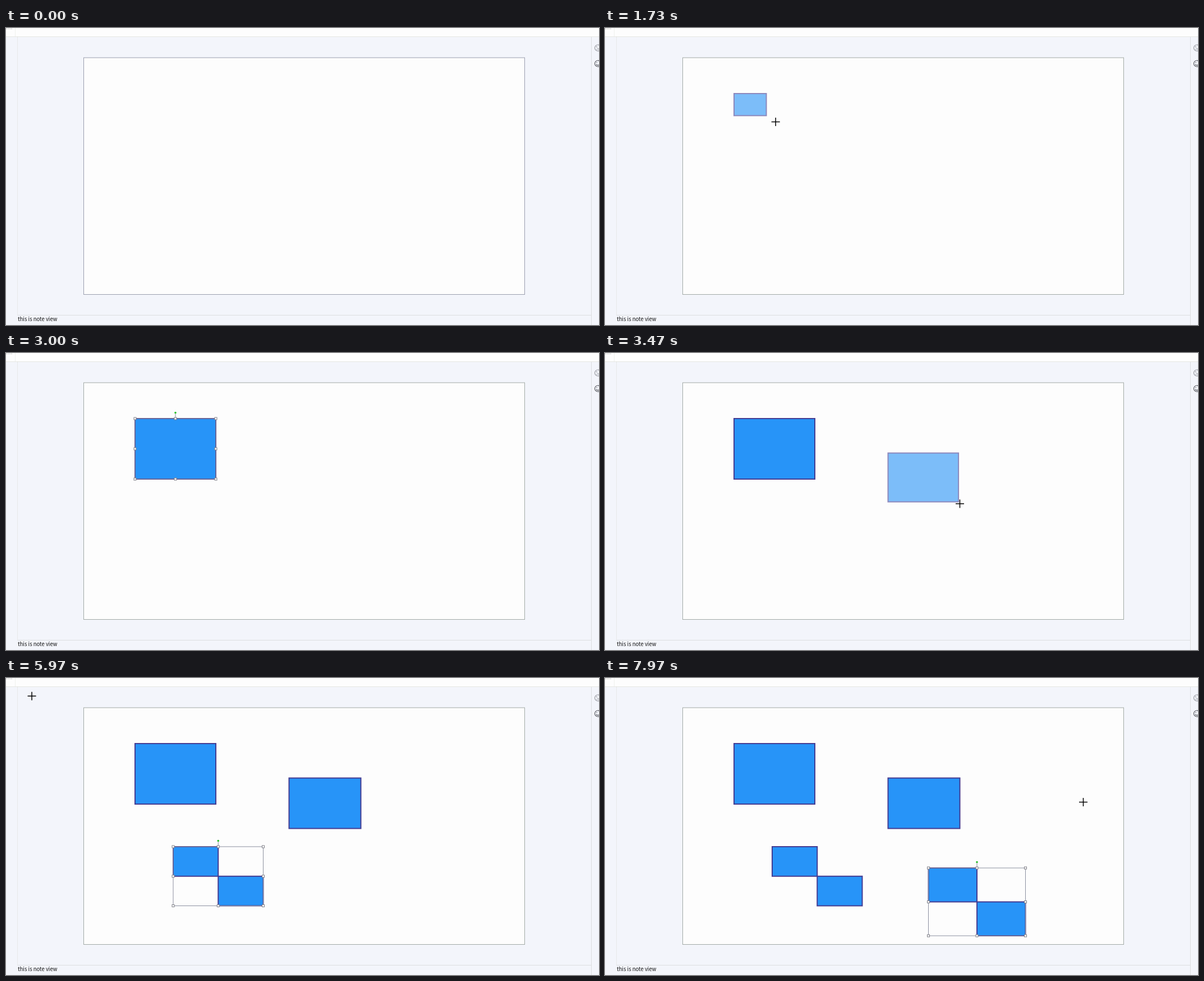
An HTML page for the animation above (8 s loop, 1057x530 px).

```html
<!DOCTYPE html>
<html lang="en">
<head>
<meta charset="utf-8">
<title>Drawing shapes</title>
<style>
html, body { margin: 0; width: 100%; height: 100%; overflow: hidden; background: #f3f5fb; }
svg { display: block; width: 1057px; height: 530px; }
.note { font: 500 9.5px "Noto Sans CJK SC", "Noto Sans", sans-serif; fill: #111; }
.shape { fill: #2794f8; stroke: #443c92; stroke-width: 2; }
.frame { fill: none; stroke: #8c90a0; }
.grip { fill: #fff; stroke: #808088; }
.cross { stroke: #000; stroke-width: 1.5; }
.face { fill: none; stroke-width: 1.1; }
</style>
</head>
<body>
<svg viewBox="0 0 1057 530">
  <rect width="1057" height="15" fill="#fdfdfd"/>
  <g fill="none">
    <path d="M0 15.5H1057" stroke="#e6e7e3"/>
    <path d="M16.5 0V15" stroke="#f0f1ee"/>
    <path d="M0 1.5H11" stroke="#c4c4c4" stroke-dasharray="2 1"/>
    <path d="M20.5 16V512" stroke="#dcdcd8" stroke-dasharray="1 1"/>
    <path d="M1043.5 16V530M20 512.5H1043" stroke="#dcdee0"/>
  </g>
  <rect id="page" x="138.5" y="53" width="786" height="422.5" fill="#fdfdfd"/>
  <g class="face" stroke="#92949a">
    <circle cx="1055" cy="35.5" r="5.5"/>
    <path d="M1052 33l2 1.5M1052.500 38.500q2.500-3 5 0"/>
  </g>
  <g class="face" stroke="#4c4e54">
    <circle cx="1055" cy="63.500" r="5.500"/>
    <path d="M1053 61v1.500M1052 65q3 3 6 0"/>
  </g>
  <text class="note" x="21" y="523">this is note view</text>
  <g id="shapes"></g>
  <g id="marks"></g>
  <path id="cross" class="cross" d="M-7.500 0H7.500M0-7.500V7.500"/>
</svg>
<script>
const LOOP = 8000, LAG = 30;
const el = id => document.getElementById(id);

// Pointer visits: rows of [time, x, y]; it shows from the first to the last row.
const visits = [
  [[800, 4, 6], [1100, 190, 95], [1440, 230, 117], [1660, 230, 117], [1700, 287, 156],
   [1730, 303.5, 167], [1830, 374, 225], [1980, 374, 225], [2130, 183, 82]],
  [[3010, 155, 31], [3240, 504.5, 178.5], [3290, 504.5, 178.5], [3440, 630, 265.5],
   [3470, 632.5, 269], [3560, 632.5, 269], [3700, 200, 41], [4000, 200, 41]],
  [[4530, 51, 61], [4760, 298, 301], [4800, 298, 301], [4840, 345, 337.5],
   [4870, 392.5, 362], [4960, 458.5, 407], [5040, 458.5, 407], [5200, 51, 61]],
  [[5970, 44, 31], [6230, 576.5, 339], [6300, 576.5, 339], [6470, 749.5, 460],
   [6500, 750, 461], [6770, 749.5, 460], [6800, 720, 452], [7000, 0, 0]],
  [[7700, 0, 0], [7930, 856, 221], [7970, 852.5, 221.5], [8001, 852.5, 221.5]]
];

const shapes = [
  { press: 1660, done: 1880, off: 3290, x: 230, y: 117, r: 374, b: 225 },
  { press: 3290, done: 3530, off: 4800, x: 504.5, y: 178.5, r: 632.5, b: 268.5 },
  { press: 4800, done: 5000, off: 6300, x: 298, y: 301, r: 458.5, b: 406.5, pair: true },
  { press: 6300, done: 6560, off: LOOP, x: 576.5, y: 339, r: 749.5, b: 460, pair: true }
];

function pointer(t) {
  const rows = visits.find(v => t >= v[0][0] && t < v[v.length - 1][0]);
  if (!rows) return null;
  const i = rows.findIndex(row => row[0] > t);
  const [t0, x0, y0] = rows[i - 1], [t1, x1, y1] = rows[i];
  const k = (t - t0) / (t1 - t0);
  return [x0 + (x1 - x0) * k, y0 + (y1 - y0) * k];
}

const box = (cls, x, y, r, b) =>
  `<rect class="${cls}" x="${x}" y="${y}" width="${Math.max(0, r - x)}" height="${Math.max(0, b - y)}"/>`;

function drawShape(s, t) {
  if (t < s.press + LAG) return "";
  const live = t < s.done;
  const [r, b] = live ? pointer(t - LAG) : [s.r, s.b];
  const mx = (s.x + r) / 2, my = (s.y + b) / 2;
  const parts = s.pair
    ? box("shape", s.x, s.y, mx, my) + box("shape", mx, my, r, b)
    : box("shape", s.x, s.y, r, b);
  return `<g opacity="${live ? 0.6 : 1}">${parts}</g>`;
}

function drawMarks(s) {
  const mx = (s.x + s.r) / 2, my = (s.y + s.b) / 2;
  let out = box("frame", s.x, s.y, s.r, s.b);
  out += `<path class="frame" d="M${mx} ${s.y}v-10"/><circle cx="${mx}" cy="${s.y - 10.500}" r="1.800" fill="#2fc12f"/>`;
  for (const x of [s.x, mx, s.r])
    for (const y of [s.y, my, s.b])
      if (x !== mx || y !== my) out += box("grip", x - 2, y - 2, x + 2, y + 2);
  return out;
}

function render(t) {
  el("page").setAttribute("stroke", t < 800 ? "#9a9eae" : "#a2aaa6");
  el("shapes").innerHTML = shapes.map(s => drawShape(s, t)).join("");
  const picked = shapes.find(s => t >= s.done && t < s.off);
  el("marks").innerHTML = picked ? drawMarks(picked) : "";
  const p = pointer(t);
  el("cross").setAttribute("visibility", p ? "visible" : "hidden");
  if (p) el("cross").setAttribute("transform", `translate(${p})`);
}

const start = performance.now();
function tick(now) {
  render(Math.max(0, now - start) % LOOP);
  requestAnimationFrame(tick);
}
render(0);
requestAnimationFrame(tick);
</script>
</body>
</html>
```
